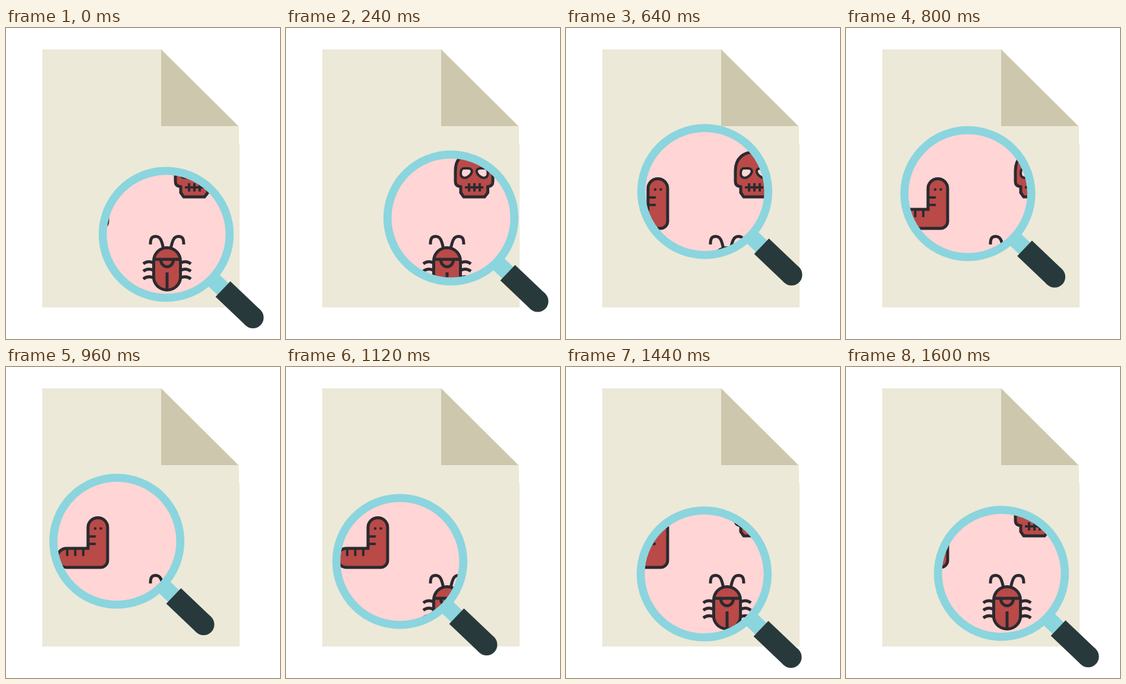
Write an HTML page that moves like this. It is 461 px wide and 523 px high and loops after 1.68 s.

```html
<!DOCTYPE html>
<html lang="en">
<head>
<meta charset="utf-8">
<title>File scan</title>
<style>
  html, body { margin: 0; width: 100%; height: 100%; overflow: hidden; background: #fff; }
  svg { display: block; }
  .bug { fill: #b94a48; stroke: #2b2a2f; stroke-width: 5; }
  .line { fill: none; }
  .thin { stroke-width: 4; }
  .dot { fill: #2b2a2f; stroke: none; }
  .hole { fill: #ffd5d5; stroke-width: 4; }
</style>
</head>
<body>
<svg width="461" height="523" viewBox="0 0 461 523">
  <defs>
    <clipPath id="view"><circle class="lens" r="101"/></clipPath>
  </defs>

  <path fill="#ece9d8" d="M61 36H261L391 165H392V195H393V470H61Z"/>
  <path fill="#cdc7ad" d="M261 36L391 165H261Z"/>

  <g clip-path="url(#view)">
    <rect width="461" height="523" fill="#ffd5d5"/>

    <g id="worm" class="bug">
      <path d="M138 305H102a16 16 0 0 0 0 32H159a12 12 0 0 0 12-12V270a16.5 16.5 0 0 0-33 0Z"/>
      <path class="line thin" d="M103 305v13M116.5 305v13M130 305v13M138 285h13M138 297.5h13"/>
      <circle class="dot" cx="150" cy="271.5" r="2.3"/>
      <circle class="dot" cx="159.5" cy="271.5" r="2.3"/>
    </g>

    <g id="skull" class="bug">
      <path d="M285 240C285 219 299 208.5 316.5 208.5S348 219 348 240V258Q348 266 339.5 267V277L334 284H299L294 277V267Q285 266 285 258Z"/>
      <path id="socket" class="hole" d="M299 236H307Q314 237 312.5 243Q309 250 302 252Q294 252 294 245Q294 236 299 236Z"/>
      <use href="#socket" transform="matrix(-1 0 0 1 633.5 0)"/>
      <path class="line thin" d="M301 268h31M308 261v14M317 261v14M326 261v14"/>
    </g>

    <g id="beetle" class="bug">
      <g id="limbs" class="line">
        <path d="M265 371C262 358 260 350.5 252 350.5S243 356 243 364"/>
        <path d="M231 396.5Q239 390.5 248 395M231 409Q239 403 248 407.5M231 422Q239 416 248 420"/>
      </g>
      <use href="#limbs" transform="matrix(-1 0 0 1 542 0)"/>
      <path d="M248.5 392a22.5 22.5 0 0 1 45 0V419a22.5 21.5 0 0 1-45 0Z"/>
      <path class="line" d="M249 389h44M271 411v30M260.500 390a10.500 11.500 0 0 0 21 0"/>
    </g>
  </g>

  <g id="glass" fill="none">
    <path stroke="#8bd5de" stroke-width="27" d="M75 72.500L97 93.500"/>
    <circle r="106.800" stroke="#8bd5de" stroke-width="13.600"/>
    <path stroke="#28393b" stroke-width="36" d="M95.500 92L146 140"/>
    <circle cx="146" cy="140" r="18" fill="#28393b"/>
  </g>
</svg>
<script>
  const LOOP = 1680, STEP = 80;
  // Closed path of the lens centre: time, x, y
  const path = [
    [0, 269.5, 347], [240, 277.5, 319.5], [480, 258.5, 288], [560, 248, 278],
    [640, 233.5, 275], [800, 205, 278.5], [960, 186.5, 293], [1120, 191.5, 327],
    [1280, 208, 343], [1440, 232.5, 348], [1600, 261.5, 347]
  ];
  const lens = document.querySelector('.lens');
  const glass = document.getElementById('glass');

  function knot(i) {
    const n = path.length, turn = Math.floor(i / n);
    const [t, x, y] = path[i - turn * n];
    return [t + turn * LOOP, x, y];
  }

  function slope(i, axis) {
    const a = knot(i - 1), b = knot(i), c = knot(i + 1);
    const h0 = b[0] - a[0], h1 = c[0] - b[0];
    return ((b[axis] - a[axis]) / h0 * h1 + (c[axis] - b[axis]) / h1 * h0) / (h0 + h1);
  }

  // Cubic Hermite interpolation between uneven knots
  function at(t, axis) {
    let i = 0;
    while (knot(i + 1)[0] <= t) i++;
    const a = knot(i), b = knot(i + 1), h = b[0] - a[0];
    const u = (t - a[0]) / h, v = 1 - u;
    return v * v * (1 + 2 * u) * a[axis] + u * u * (1 + 2 * v) * b[axis]
      + h * u * v * (v * slope(i, axis) - u * slope(i + 1, axis));
  }

  function draw(now) {
    const t = Math.floor(now % LOOP / STEP) * STEP;
    const x = at(t, 1), y = at(t, 2);
    lens.setAttribute('cx', x);
    lens.setAttribute('cy', y);
    glass.setAttribute('transform', `translate(${x} ${y})`);
  }

  let start;
  function tick(now) {
    start ??= now;
    draw(now - start);
    requestAnimationFrame(tick);
  }
  draw(0);
  requestAnimationFrame(tick);
</script>
</body>
</html>
```
